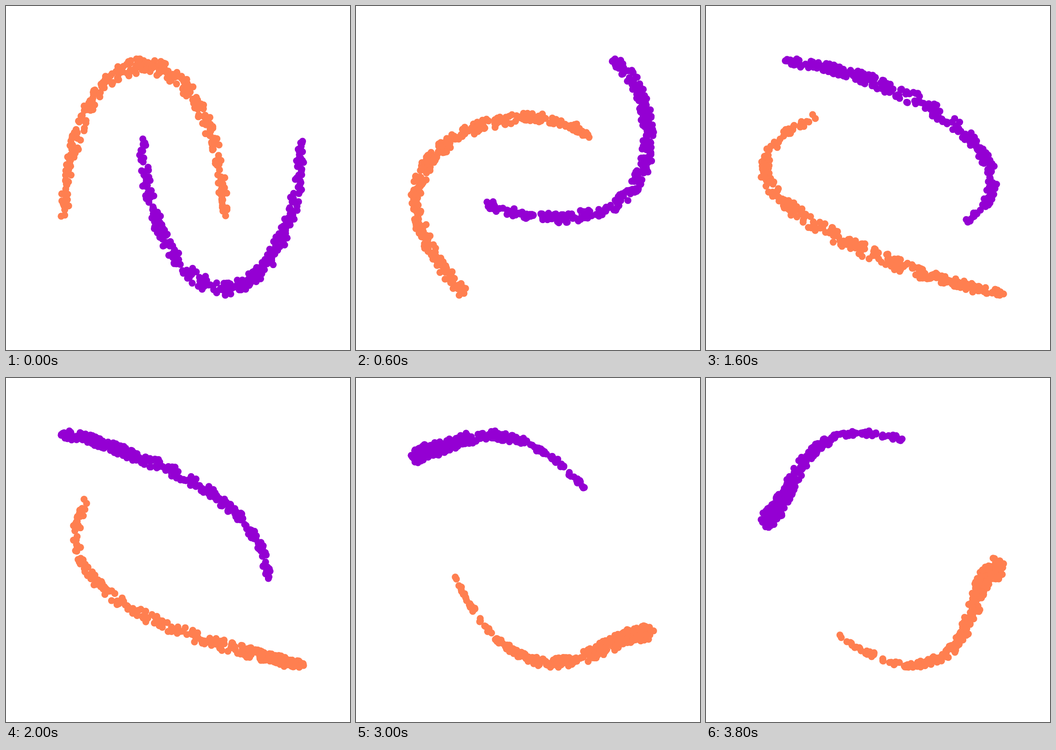
Write an HTML page with a canvas that moves like this. It is 748 px wide and 748 px high and loops after 4000 ms.

```html
<!DOCTYPE html>
<html>
<head>
<meta charset="utf-8">
<style>
  html, body { margin: 0; height: 100%; overflow: hidden; background: #fff; }
  canvas { display: block; }
</style>
</head>
<body>
<canvas id="stage" width="748" height="748"></canvas>
<script>
const ctx = document.getElementById('stage').getContext('2d');
const STEP = 200, STEPS = 20, DOTS = 300, RADIUS = 7.6;
const BOX = [[120, 647], [115, 629]];

// Pose steps; each pose holds five x,y pairs from the outer tip to the inner tip.
const TIMES = [0, 3, 6, 10, 13, 15, 19];
const CORAL = [
  [127, 455, 178, 228, 298, 133, 420, 226, 470, 455],
  [233, 618, 140, 480, 162, 335, 325, 252, 500, 288],
  [530, 620, 345, 552, 195, 450, 140, 330, 340, 245],
  [636, 618, 560, 600, 450, 570, 250, 480, 178, 272],
  [632, 606, 575, 604, 490, 603, 352, 581, 193, 360],
  [632, 548, 602, 556, 530, 588, 400, 612, 217, 435],
  [628, 402, 616, 425, 588, 475, 525, 594, 290, 562]
];
const VIOLET = [
  [638, 297, 588, 520, 468, 612, 346, 512, 298, 295],
  [557, 126, 629, 245, 603, 392, 462, 458, 285, 430],
  [298, 122, 420, 163, 545, 240, 621, 365, 475, 472],
  [130, 126, 215, 146, 325, 188, 465, 268, 564, 432],
  [135, 135, 180, 132, 260, 144, 370, 176, 528, 330],
  [134, 178, 157, 162, 212, 144, 320, 131, 497, 242],
  [136, 318, 146, 295, 175, 248, 240, 156, 426, 139]
];
// Half thickness at the outer tip, middle and inner tip.
const SPREAD = [
  [9, 17, 9], [12, 14, 9], [8, 18, 7], [10, 12, 8],
  [17, 15, 4], [17, 15, 4], [18, 16, 5]
];

let seed = 11;
function random() {
  seed = (seed * 16807) % 2147483647;
  return seed / 2147483647;
}

function makeDots() {
  return Array.from({ length: DOTS }, (_, i) => {
    const r = Math.sqrt(random()), a = random() * 2 * Math.PI;
    const u = i < 2 ? i : random();
    return { u, dx: r * Math.cos(a), dy: r * Math.sin(a) };
  });
}

const moons = [
  { color: '#ff7f50', poses: CORAL, dots: makeDots() },
  { color: '#9400d3', poses: VIOLET, dots: makeDots() }
];

// Smooth blend of the rows at step k (Hermite, uneven spacing).
function blend(rows, k) {
  let i = 0;
  while (i < TIMES.length - 2 && k >= TIMES[i + 1]) i++;
  const h = TIMES[i + 1] - TIMES[i], s = (k - TIMES[i]) / h;
  const slope = (n, c) => (rows[n + 1][c] - rows[n][c]) / (TIMES[n + 1] - TIMES[n]);
  const tangent = (n, c) => {
    if (n === 0) return slope(0, c);
    if (n === TIMES.length - 1) return slope(n - 1, c);
    const before = TIMES[n] - TIMES[n - 1], after = TIMES[n + 1] - TIMES[n];
    return (slope(n - 1, c) * after + slope(n, c) * before) / (before + after);
  };
  return rows[i].map((p, c) => {
    const q = rows[i + 1][c];
    return p + (q - p) * s * s * (3 - 2 * s)
      + h * s * (1 - s) * ((1 - s) * tangent(i, c) - s * tangent(i + 1, c));
  });
}

// Quartic through the five points of a pose.
function pointAt(pose, u) {
  let x = 0, y = 0;
  for (let j = 0; j < 5; j++) {
    let w = 1;
    for (let m = 0; m < 5; m++) if (m !== j) w *= (4 * u - m) / (j - m);
    x += w * pose[2 * j];
    y += w * pose[2 * j + 1];
  }
  return [x, y];
}

function thickness(spread, u) {
  const j = u < 0.5 ? 0 : 1;
  return spread[j] + (spread[j + 1] - spread[j]) * (2 * u - j);
}

function place(k) {
  const spread = blend(SPREAD, k);
  const groups = moons.map(({ poses, dots }) => {
    const pose = blend(poses, k);
    return dots.map(({ u, dx, dy }) => {
      const [x, y] = pointAt(pose, u), t = thickness(spread, u);
      return [x + t * dx, y + t * dy];
    });
  });
  // The cloud always fills the same box.
  const all = groups.flat();
  BOX.forEach(([from, to], axis) => {
    const values = all.map(p => p[axis]);
    const low = Math.min(...values), high = Math.max(...values);
    for (const p of all) p[axis] = from + (p[axis] - low) / (high - low) * (to - from);
  });
  return groups;
}

function draw(k) {
  ctx.fillStyle = '#fff';
  ctx.fillRect(0, 0, 748, 748);
  place(k).forEach((points, i) => {
    ctx.fillStyle = moons[i].color;
    for (const [x, y] of points) {
      ctx.beginPath();
      ctx.arc(x, y, RADIUS, 0, 2 * Math.PI);
      ctx.fill();
    }
  });
}

const start = performance.now();
function tick() {
  draw(Math.floor((performance.now() - start) / STEP) % STEPS);
  requestAnimationFrame(tick);
}
tick();
</script>
</body>
</html>
```
